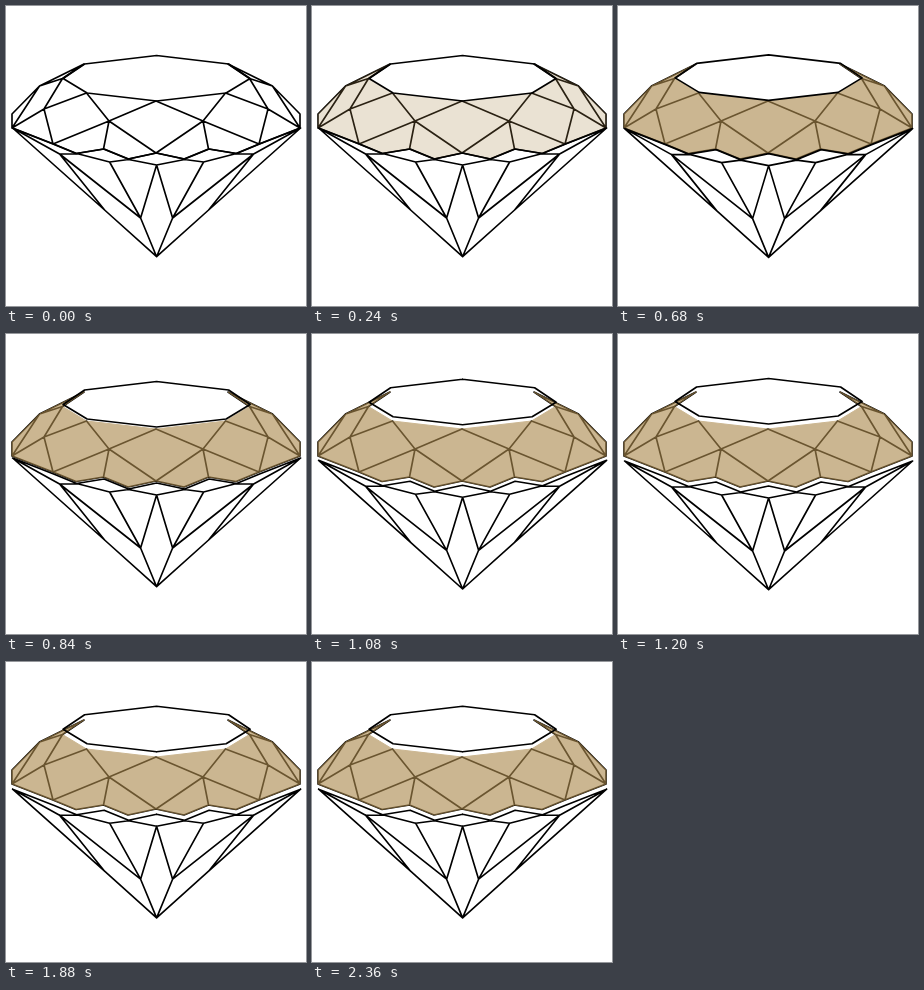
An HTML page for the animation above (2400 ms loop, 300x300 px).

```html
<!DOCTYPE html>
<html lang="en">
<head>
<meta charset="utf-8">
<title>Diamond</title>
<style>
  html, body { margin: 0; width: 100%; height: 100%; overflow: hidden; background: #fff; }
  svg { display: block; width: 100vw; height: 100vh; }
  path { fill: none; stroke: #000; stroke-width: 1.65; stroke-linejoin: round; stroke-linecap: round; }
  #tint { fill: #ac8a4e; stroke: #ac8a4e; stroke-width: 1; }
</style>
</head>
<body>
<svg viewBox="0 0 300 300">
  <path id="crown"/>
  <g id="glow" opacity="0"><path id="tint"/></g>
  <path id="pavilion"/>
  <path id="table"/>
</svg>
<script>
  const LOOP = 2400, LIFT = 5.2, TINT = 0.62, NUDGE = 0.6;
  const $ = id => document.getElementById(id);
  const flip = pts => pts.map(([x, y]) => [300 - x, y]);
  const line = pts => 'M' + pts.map(p => p.join(' ')).join('L');
  const both = lines => lines.map(l => line(l) + line(flip(l))).join('');

  // Left half; the right half is its mirror image.
  const shoulder = [33.5, 80], star = [38, 103], front = [103, 115];
  const back = [78, 58], side = [56.5, 72.5], near = [80.5, 87], middle = [150, 95];
  const rim = [[6, 122], [47, 138], [70, 147.5], [97.5, 143], [122, 153], [150, 147]];
  const girdle = [[6, 122], [53, 148], [72, 148], [103, 156], [122, 153.5], [150, 159]];
  const low = [134, 212], far = [98, 204], tip = [150, 250.7];
  const outer = [back, shoulder, [6, 108], ...rim];
  const inner = [back, side, near, middle];

  $('table').setAttribute('d', both([[[150, 49.5], ...inner]]));
  $('crown').setAttribute('d', both([
    outer,
    [back, side],
    [rim[0], shoulder, side, star, near, front, middle],
    [rim[0], star, rim[1], front, rim[5]],
    [front, rim[3]]
  ]));
  $('tint').setAttribute('d', line([
    ...outer, ...flip(outer).reverse(), ...flip(inner), ...[...inner].reverse()
  ]) + 'Z');
  $('pavilion').setAttribute('d', both([
    rim, girdle,
    [rim[0], far, tip],
    [far, girdle[1], low, tip],
    [girdle[3], low, girdle[5]]
  ]));

  const part = (t, a, b) => Math.min(1, Math.max(0, (t - a) / (b - a)));
  const ease = p => (1 - Math.cos(Math.PI * p)) / 2;
  const move = (id, y) => $(id).setAttribute('transform', `translate(${NUDGE} ${y})`);

  function draw(t) {
    const shift = LIFT * ease(part(t, 500, 1300));
    $('glow').setAttribute('opacity', TINT * part(t, 60, 520));
    move('table', -shift);
    move('pavilion', shift);
  }

  const start = performance.now();
  function tick() {
    draw((performance.now() - start) % LOOP);
    requestAnimationFrame(tick);
  }
  tick();
</script>
</body>
</html>
```
